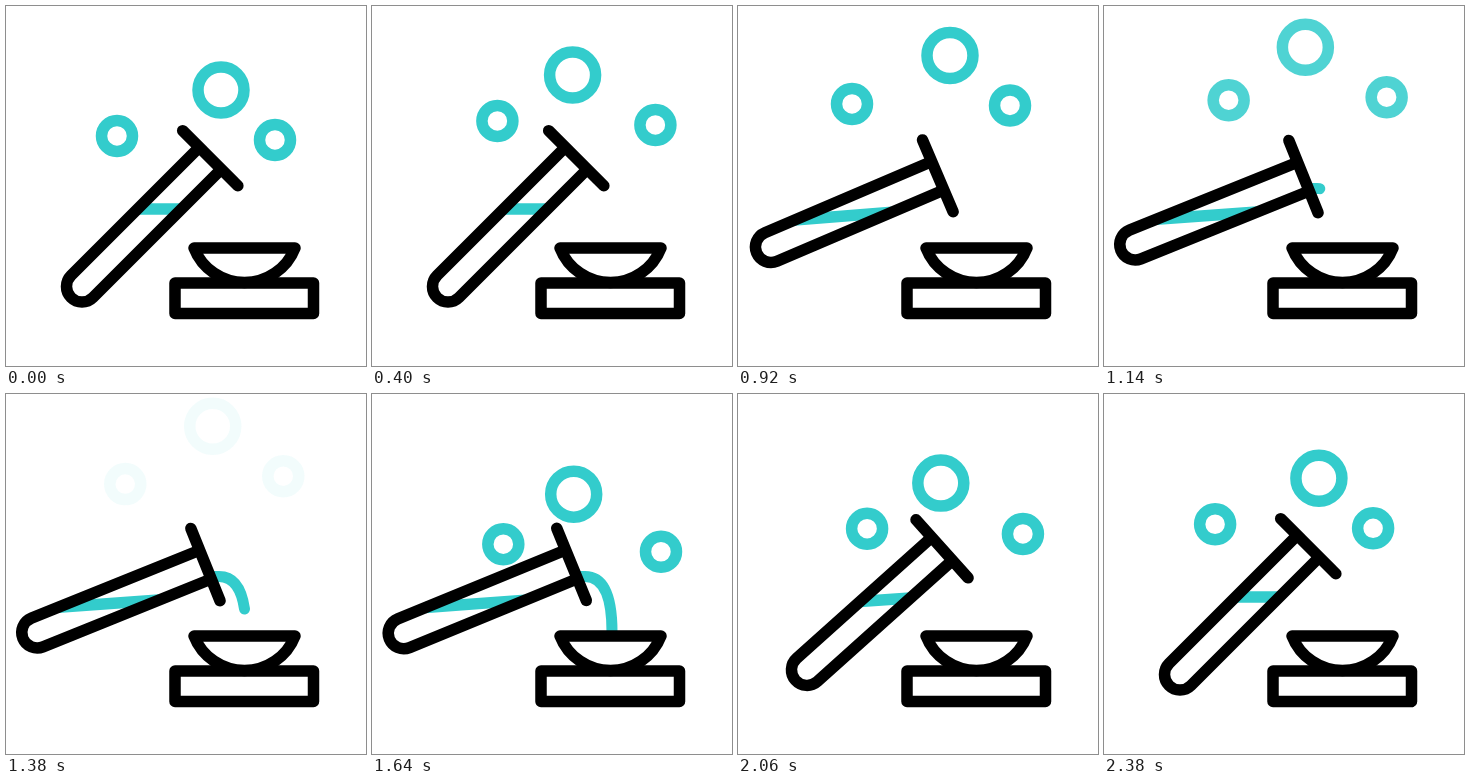
Recreate the animation shown at these times as an HTML page. Size 360 by 360 pixels, loop 2400 ms.

```html
<!DOCTYPE html>
<html>
<head>
<meta charset="utf-8">
<style>
  html, body { margin: 0; height: 100%; overflow: hidden; background: #fff; }
  svg { display: block; width: 100%; height: 100%; fill: none; stroke: #000;
    stroke-width: 11.5; stroke-linejoin: round; }
  .teal { stroke: #3cc; }
  .round { stroke-linecap: round; }
</style>
</head>
<body>
<svg viewBox="0 0 360 360">
  <g id="rings" class="teal">
    <circle r="23"/>
    <circle r="15.5"/>
    <circle r="15.5"/>
  </g>
  <path id="stream" class="teal round" stroke-width="11" d="M205 182.5H213C233 182.5 240 205 240 238"/>
  <g id="tube">
    <g transform="translate(76 280.5) rotate(-45)">
      <line id="liquid" class="teal" y1="-15.5" x2="125" y2="15.5"/>
      <path d="M181.4 -15.5H0A15.5 15.5 0 0 0 0 15.5H181.4"/>
      <path class="round" d="M181.4 -39V39"/>
    </g>
  </g>
  <path d="M188 242H289A54.2 54.2 0 0 1 188 242Z"/>
  <rect x="169" y="277" width="138.5" height="30.5"/>
</svg>
<script>
const LOOP = 2400;
const get = id => document.getElementById(id);
const tube = get('tube'), liquid = get('liquid'), stream = get('stream');
const streamLength = stream.getTotalLength();

const ramp = (t, from, to) => Math.min(1, Math.max(0, (t - from) / (to - from)));
const ease = (t, from, to) => { const u = ramp(t, from, to); return u * u * (3 - 2 * u); };
const mix = (a, b, u) => a + (b - a) * u;

// home: resting place; low: where the ring reappears; mid: where it turns towards home
const rings = [
  { home: [215, 84], low: [201.5, 107], mid: [202, 90], side: -1, lateSpeed: .0375 },
  { home: [111, 130], low: [132, 160], mid: [130.3, 135.5], side: 1, lateSpeed: .017 },
  { home: [269, 134], low: [291, 169], mid: [286, 141], side: 1, lateSpeed: .0375 }
];
[...get('rings').children].forEach((el, i) => rings[i].el = el);

function ringPosition({ home, low, mid, side, lateSpeed }, t) {
  if (t < 1400) {
    const sway = 7.2 * (1 - Math.cos(t * Math.PI / 400));
    const rise = .0375 * Math.min(t, 800) + lateSpeed * Math.max(0, t - 800);
    return [home[0] + side * sway, home[1] - rise];
  }
  if (t < 2000) return low.map((v, i) => mix(v, mid[i], ramp(t, 1400, 2000)));
  return [mix(mid[0], home[0], ease(t, 2000, 2400)), mix(mid[1], home[1], ramp(t, 2000, 2400))];
}

function draw(t) {
  const tilt = ease(t, 400, 1000) - ease(t, 1600, 2200);
  tube.setAttribute('transform', `rotate(${23 * tilt} 156.7 149.5)`);
  liquid.setAttribute('x1', mix(94, 29, tilt));

  const head = streamLength * ease(t, 1000, 1600);
  const tail = streamLength * ease(t, 1600, 2000);
  stream.style.display = head > tail ? '' : 'none';
  stream.style.strokeDasharray = `0 ${tail} ${head - tail} 999`;

  const alpha = t < 1400 ? 1 - ramp(t, 1100, 1400) : ramp(t, 1400, 1600);
  for (const ring of rings) {
    const [x, y] = ringPosition(ring, t);
    ring.el.setAttribute('cx', x);
    ring.el.setAttribute('cy', y);
    ring.el.style.opacity = alpha;
  }
}

const start = performance.now();
function frame() {
  draw((performance.now() - start) % LOOP);
  requestAnimationFrame(frame);
}
frame();
</script>
</body>
</html>
```
